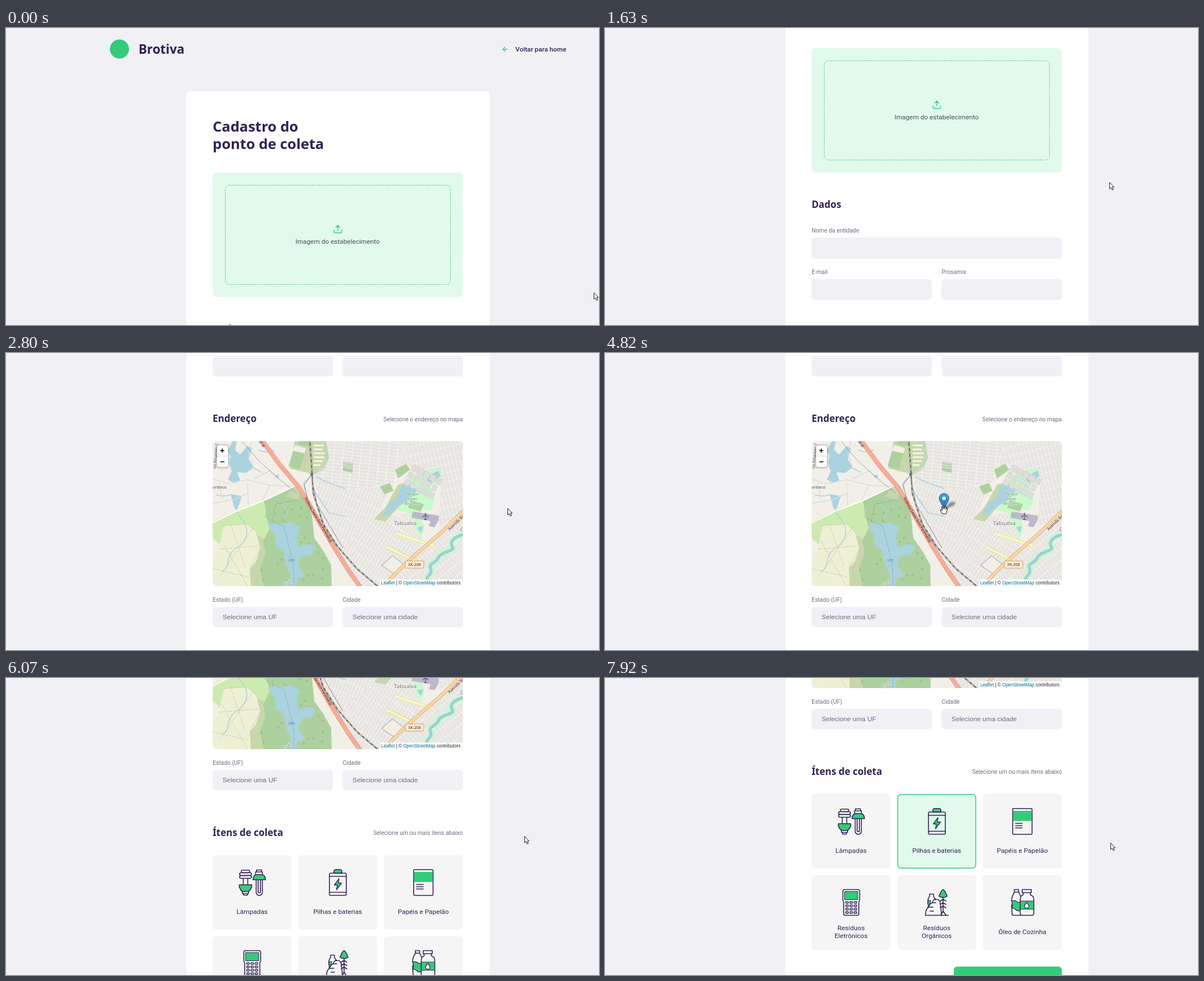
These frames come from a looping animation (1056x530 px, 8000 ms). An HTML page:

```html
<!DOCTYPE html>
<html lang="pt-BR">
<head>
<meta charset="utf-8">
<title>Cadastro do ponto de coleta</title>
<style>
html, body { margin: 0; width: 100%; height: 100%; overflow: hidden; background: #f0f0f5; }
svg { display: block; }
text { font: 11.84px Roboto, sans-serif; fill: #322153; }
.h, .h1, .brand { font-family: "Noto Sans", "Open Sans", sans-serif; font-weight: 700; }
.h { font-size: 17px; }
.h1 { font-size: 25.5px; }
.brand { font-size: 22.5px; }
.back { font-weight: 500; }
.label { font-size: 10.36px; fill: #6c6c80; }
.select { font-family: "Liberation Sans", Arial, sans-serif; fill: #6c6c80; }
.mid { text-anchor: middle; }
.end { text-anchor: end; }
.field { fill: #f0f0f5; }
.tile { fill: #f5f5f5; }
.line { fill: none; stroke: #34cb79; stroke-linecap: round; stroke-linejoin: round; }
#icons { fill: none; stroke: #322153; stroke-width: 1.6; stroke-linejoin: round; stroke-linecap: round; }
#icons .g { fill: #34cb79; }
#icons .w { fill: #f5f5f5; }
#map text { font: 7px "Noto Sans", sans-serif; fill: #333; paint-order: stroke; stroke: #fff; stroke-width: 1.2px; stroke-linejoin: round; }
#map .road { fill: #4a1d10; stroke: none; }
#map .park { font-style: italic; fill: #3a8a3a; text-anchor: middle; }
#map .credit { font: 8.14px "Liberation Sans", Arial, sans-serif; stroke: none; }
#map .link { fill: #0078a8; }
#map .zoom { font: bold 14px "Liberation Sans", Arial, sans-serif; fill: #000; stroke: none; text-anchor: middle; }
.water { fill: #aad3df; }
.wood { fill: #add19e; }
.scrub { fill: #c8d7ab; }
.grass { fill: #cdebb0; }
.stream { fill: none; stroke: #aad3df; }
.way { fill: none; stroke-linejoin: round; }
.cursor { fill: #fff; stroke: #000; stroke-width: .9; stroke-linejoin: round; }
</style>
</head>
<body>
<svg width="1056" height="530" viewBox="0 0 1056 530">
<defs>
  <clipPath id="mapClip"><rect x="368" y="157.5" width="445.5" height="258.5" rx="6"/></clipPath>
  <path id="forest" d="M460 264L517 236 527 243 545 290 549 330 565 353 579 378 580 416H459L452 385 462 358 458 335 470 312 463 290Z"/>
  <clipPath id="forestClip"><use href="#forest"/></clipPath>
  <path id="highway" d="M455 155L488 200 522 240 535 262 560 305 585 348 608 385 631 418"/>
  <path id="rail" d="M541 155L545 215 547 250 565 305 590 345 625 385 664 418"/>
  <path id="avenue" d="M815 281L773 322 738 352 705 382 670 418"/>
  <path id="lanes" d="M694 322L762 344M678 346L735 374"/>
  <path id="river" d="M814 324C794 330 790 338 795 346S774 354 770 365 752 374 756 385 748 396 749 406"/>
  <linearGradient id="pinFill" x2="0" y2="1"><stop stop-color="#4a9fda"/><stop offset="1" stop-color="#2070b0"/></linearGradient>
  <filter id="soft"><feGaussianBlur stdDeviation="1.5"/></filter>
  <g id="pin">
    <path d="M9 30L18 18Q27 13 29 17T20 25Z" fill="#333" opacity=".5" filter="url(#soft)"/>
    <path transform="scale(.74)" d="M12.5.5C5.8.5.5 5.8.5 12.5 .5 19 7 25 12.5 40.5 18 25 24.5 19 24.5 12.5 24.5 5.8 19.2.5 12.5.5Z" fill="url(#pinFill)" stroke="#2e6c97"/>
    <circle cx="9.25" cy="9.3" r="3.1" fill="#fff"/>
  </g>
</defs>
<rect width="1056" height="530" fill="#f0f0f5"/>
<g id="page">
  <circle cx="202" cy="37.5" r="17" fill="#34cb79"/>
  <text class="brand" x="236" y="46">Brotiva</text>
  <path class="line" stroke-width="1.3" d="M892.5 38H885M888.5 34.3L885 38 888.5 41.7"/>
  <text class="back" x="907" y="42">Voltar para home</text>

  <rect x="321" y="113" width="540" height="1600" rx="6" fill="#fff"/>
  <text class="h1" x="368" y="185">Cadastro do</text>
  <text class="h1" x="368" y="216">ponto de coleta</text>
  <rect x="368" y="258" width="445.5" height="221.7" rx="7" fill="#e1faec"/>
  <rect x="390.5" y="280.5" width="401" height="177" rx="7" fill="none" stroke="#4ecb79" stroke-dasharray="2.5 1.7"/>
  <path class="line" transform="translate(582 350) scale(.74)" stroke-width="2" d="M21 15v4a2 2 0 0 1-2 2H5a2 2 0 0 1-2-2v-4M17 8L12 3 7 8M12 3V15"/>
  <text class="mid" x="590.5" y="385" style="fill:#4e4958">Imagem do estabelecimento</text>

  <text class="h" x="368" y="543">Dados</text>
  <text class="label" x="368" y="587">Nome da entidade</text>
  <rect class="field" x="368" y="596" width="445.5" height="37.5" rx="6"/>
  <text class="label" x="368" y="661">E-mail</text>
  <text class="label" x="599.5" y="661">Prosamix</text>
  <rect class="field" x="368" y="670" width="214" height="37" rx="6"/>
  <rect class="field" x="599.5" y="670" width="214" height="37" rx="6"/>

  <text class="h" x="368" y="788">Endereço</text>
  <text class="label end" x="813.5" y="786.5">Selecione o endereço no mapa</text>
  <g transform="translate(0 665)"><g id="map" clip-path="url(#mapClip)">
    <rect x="368" y="157" width="446" height="260" fill="#f2efe9"/>
    <g id="streets"></g>
    <path class="grass" d="M368 301L408 281 430 273 462 263 472 312 458 335 440 340 384 345 368 330Z"/>
    <path class="scrub" d="M440 322L458 330 466 358 462 416H434V375L448 345Z"/>
    <path d="M388 308L430 305 446 320 453 348 445 372 434 385 436 416H382L368 408V372L380 345Z" fill="#eef0d5"/>
    <path class="way" d="M388 308L430 305 446 320 453 348 434 385M380 350L450 344M400 306L425 380M440 312L380 400M368 385L432 400M384 335L430 416" stroke="#c9b08b" stroke-width=".8" stroke-dasharray="3 2"/>
    <use href="#forest" class="wood"/>
    <path class="scrub" d="M515 238L527 244 520 262 498 256Z"/>
    <g id="trees" clip-path="url(#forestClip)"></g>
    <path class="water" d="M466 307L480 303 493 305 507 302 524 311 518 330 521 346 540 340 552 347 545 359 526 362 520 378 533 398 519 402 517 416H505L507 395 498 377 494 352 481 345 479 324Z"/>
    <path class="way" d="M474 300L495 309 504 345 512 380 513 416M474 300L480 270 520 262M460 290L474 300" stroke="#8aa6a0" stroke-width=".9" stroke-dasharray="4 1.5"/>
    <path class="stream" d="M412 275C405 290 434 300 428 325S400 345 396 370 385 385 383 390M497 302L501 284 492 270" stroke-width="1.5"/>
    <path class="water" d="M404 157H411L408 173 417 181 430 166 438 170 432 190 441 204 428 214 412 213 417 227 407 232 395 226 402 211 397 196 400 184 395 174Z"/>
    <path class="water" d="M400 252L420 255 412 279 407 278ZM481 217l5 1-1 6-6-2Z"/>
    <path class="stream" d="M450 173Q465 180 478 173M374 253Q390 258 402 252M440 205L456 213" stroke-width="1.5"/>
    <path class="way" d="M368 225L395 233 430 226 470 236 516 238M430 232L432 274M441 205L432 180 438 157M470 236L455 266M368 268L405 262 432 250M485 225L470 210 440 225M380 232L384 260" stroke="#dedad4" stroke-width="1.4"/>
    <path class="way" d="M420 157L450 192 470 210 490 228 518 250" stroke="#8c8c8c" stroke-width=".8"/>
    <path class="way" d="M368 303L408 283 460 263 517 236" stroke="#fff" stroke-width="2"/>

    <path class="scrub" d="M514 157H570L575 186 565 205 546 216 505 206Z"/>
    <path class="wood" d="M511 176L532 179 523 208 503 202ZM523 157H540V166L517 163ZM600 193L618 196 617 214 600 210Z"/>
    <path d="M515 164L534 170 532 179 510 174Z" fill="#f2efe9"/>
    <path class="way" d="M600 195L618 198M600 199L618 202M600 203L618 206" stroke="#dedddc" stroke-width="2"/>
    <path class="way" d="M548 165H566M548 172H566M548 179H568M548 186H567M548 193H564M548 200H560" stroke="#f7f3ea" stroke-width="3"/>
    <path class="stream" d="M570 157L565 172 574 187 566 207 547 216 530 232 532 245M553 221L570 230 604 242M548 245L575 285 605 292" stroke-width="1.6"/>

    <path class="wood" d="M693 208L712 198 720 208 698 224ZM666 238L684 232 690 246 674 252Z"/>
    <path d="M715 226L740 212 770 205 776 222 755 238 764 260 757 281 738 279 745 314 738 333 729 312 716 285 690 278 702 250Z" fill="#c8facc"/>
    <path class="scrub" d="M698 235L716 230 707 266 676 301 655 296 676 275Z"/>
    <path class="water" d="M704 237L722 234 732 246 716 265 694 275 682 291 672 287 680 270 697 258ZM748 222L770 210 774 219 752 234ZM732 311L743 309 739 321Z"/>
    <path class="wood" d="M720 262L744 270 739 283 716 276Z"/>
    <g id="blocks" fill="#dedddc" stroke="#c8c5c2" stroke-width=".5"></g>
    <path d="M724 283L771 290 770 299 763 311 753 309 756 300 722 294Z" fill="#bbb9cb"/>
    <path d="M747 285v13M741 293l6-4 6 4M744 297h6" stroke="#6b5b95" stroke-width="1.5" fill="none"/>

    <g class="way">
      <use href="#lanes" stroke="#d8d39a" stroke-width="6"/>
      <use href="#lanes" stroke="#f7f8be" stroke-width="4.6"/>
      <path d="M688 362L709 378 691 394 669 379Z" fill="#f2efe9" stroke="#b9b3b5" stroke-width="1.2"/>
      <use href="#river" stroke="#c8facc" stroke-width="12"/>
      <use href="#river" stroke="#9fcdda" stroke-width="5.5"/>
      <use href="#avenue" stroke="#c9a16b" stroke-width="6"/>
      <use href="#avenue" stroke="#fcd6a4" stroke-width="4.6"/>
      <use href="#highway" stroke="#d5735a" stroke-width="7.6"/>
      <use href="#highway" stroke="#f9b29c" stroke-width="6.4"/>
      <use href="#highway" stroke="#e6957e" stroke-width=".7"/>
      <use href="#rail" stroke="#707070" stroke-width="2.6"/>
      <use href="#rail" stroke="#eee" stroke-width="1.1" stroke-dasharray="5 5"/>
      <path d="M546 215L531 235 542 278 580 335M545 225L554 270 600 348" stroke="#888" stroke-width="1"/>
    </g>
    <path d="M542 214h5v5h-5z" fill="#777"/>

    <text transform="translate(373 207) rotate(-84)">ua Amarildo T</text>
    <text x="368" y="242">oribeco</text>
    <text class="road" transform="translate(449 157) rotate(52)">etral</text>
    <text class="road" transform="translate(531 259) rotate(60)" style="font-size:6.5px">Rodovia Sexto Arco Perimetral</text>
    <text x="503" y="372" style="font-style:italic;fill:#4d80b3;stroke:none">Uré</text>
    <text transform="translate(494 417) rotate(-32)" style="fill:#666">elvaia</text>
    <text class="park" x="724" y="254">Parque</text>
    <text class="park" x="724" y="262.5">Fonte</text>
    <text class="park" x="724" y="271">da Lontra</text>
    <text x="691" y="307" style="font-size:9.7px;fill:#666">Tabualva</text>
    <text class="road" transform="translate(790 317) rotate(-44)">Avenida Bo</text>
    <text x="809" y="318" style="font-size:9px;fill:#666">C</text>
    <rect x="711" y="371" width="33" height="13" rx="2" fill="#fbe8d0" stroke="#c9a16b"/>
    <text x="727.5" y="380" class="mid" style="stroke:none">XK-208</text>

    <use id="pinA" href="#pin" x="626" y="228"/>
    <use id="pinB" href="#pin" x="594.5" y="250"/>

    <rect x="374.8" y="164" width="21.5" height="41" rx="4" fill="#000" opacity=".3" filter="url(#soft)"/>
    <rect x="376" y="165" width="19.2" height="38.5" rx="3" fill="#fff"/>
    <path d="M376 184H395.2" stroke="#ccc" stroke-width=".8"/>
    <text class="zoom" x="385.2" y="179">+</text>
    <text class="zoom" x="385.2" y="198.5">−</text>
    <rect x="666" y="404" width="148" height="12" fill="#fff" opacity=".75"/>
    <text class="credit" x="668" y="413"><tspan class="link">Leaflet</tspan> | © <tspan class="link">OpenStreetMap</tspan> contributors</text>
  </g></g>

  <text class="label" x="368" y="1109">Estado (UF)</text>
  <text class="label" x="599.5" y="1109">Cidade</text>
  <rect class="field" x="368" y="1118" width="214" height="36.5" rx="6"/>
  <rect class="field" x="599.5" y="1118" width="214" height="36.5" rx="6"/>
  <text class="select" x="385.7" y="1139.5">Selecione uma UF</text>
  <text class="select" x="617" y="1139.5">Selecione uma cidade</text>

  <text class="h" x="368" y="1235.5">Ítens de coleta</text>
  <text class="label end" x="813.5" y="1234">Selecione um ou mais itens abaixo</text>
  <g id="tiles"></g>
  <rect id="chosen" x="521.3" y="1270.8" width="139" height="131.5" rx="6" fill="#e1faec" stroke="#34cb79" stroke-width="1.5"/>
  <g id="captions"></g>
  <g id="icons" transform="translate(0 1063)">
    <rect x="419" y="234" width="15" height="4.5" rx="2.2"/>
    <rect x="416" y="238.5" width="21" height="5" rx="2.5"/>
    <rect x="416" y="243.5" width="21" height="5" rx="2.5"/>
    <path d="M422.5 248.5V260M430.5 248.5V260"/>
    <path class="g" d="M415.5 260H437.5V264Q436 269 432 272H421Q417 269 415.5 264Z"/>
    <path d="M421 272V275.5H432V272M423 275.5V278.5H430V275.5M446 237V233.5H455V237M444.5 242V237H456.5V242M445.5 251V273.5A5.3 5.3 0 0 0 456.5 273.5V251M449 251V273Q451 276 453 273V251"/>
    <path class="g" d="M440 251Q440 242 447 242H455Q462 242 462 251Z"/>

    <path class="g" d="M584 239.5V236Q584 233 587 233H595Q598 233 598 236V239.5Z"/>
    <rect x="576" y="239.3" width="30" height="39.5" rx="2"/>
    <path d="M576 245H606M576 273.5H606"/>
    <path class="g" stroke-width="1.3" d="M593 249L584.5 260.5H590L588.5 269 597.5 257H592Z"/>

    <rect x="726" y="233" width="34.5" height="46" rx="2"/>
    <path class="g" stroke="none" d="M726.8 237H759.8V255H726.8Z"/>
    <path d="M731 259.5H743M731 263.5H743M731 267.5H743"/>

    <path d="M427 377.5H450Q453.5 377.5 453.5 381V396L452 400V421Q452 423.5 449 423.5H428Q425 423.5 425 421V400L423.5 396V381Q423.5 377.5 427 377.5Z"/>
    <path class="g" stroke-width="1" d="M427 381H450V395.5H427Z"/>
    <g id="keys" stroke-width="1.3"></g>

    <path d="M578 390V385.5H585V390M578 390Q575 393 575 398V403M585 390Q588 393 588 396"/>
    <path class="g" stroke-width="1" d="M575.5 397H580L578 406 575.5 409Z"/>
    <path d="M570.5 423.5Q571 412 576 409 577 403 583 401 584 394 590 395 597 395 597 403 599 414 599 423.5ZM583 401H589M576 409H584M579 416H585M570.5 423.5H611.5"/>
    <path class="g" d="M602 377.5Q605 378 609 389Q608 391.5 602 391.5T595 389Q599 378 602 377.5Z"/>
    <path d="M602 391.5V418M597 398L602 395 607 398M597 404L602 401 607 404M597 410L602 407 607 410M598 423L602 416 607 423"/>

    <path d="M729 382V377.5H736.5V382ZM729 382Q724 391 724 397 727 402 724 406L725 421Q725 423.5 728 423.5H740M736.5 382L740 389"/>
    <path class="g" stroke-width="1.2" d="M724 398Q730 396 733 399T740 399V415Q735 417 731 413T724.5 412Q727 404 724 398Z"/>
    <path class="w" d="M743 383V377.5H759V383ZM744.5 383H757.5V387Q763.5 389 763.5 394V420Q763.5 423.5 760 423.5H743Q739.5 423.5 739.5 420V394Q739.5 389 744.5 387Z"/>
    <path class="g" stroke-width="1.2" d="M739.5 398H763.5V412.5H739.5Z"/>
    <path class="w" stroke-width="1.2" d="M751 400.5Q755 405 755 407A4 3.6 0 0 1 747 407Q747 405 751 400.5Z"/>
  </g>
  <rect x="621" y="1578" width="192.5" height="40" rx="6" fill="#34cb79"/>
</g>
<g id="cursor" class="cursor">
  <path id="arrow" d="M.5.5V12L3.2 9.6 5.2 14 7.2 13.1 5.3 8.9H8.5Z"/>
  <path id="grab" d="M-3 8L-6.3 2Q-6.8-.2-4.5.3L-3 2.5-4.2-4Q-3.5-6-2.3-4L-1.2-.5-.9-6.5Q.5-8 1-6L1.2-.7 2.4-5.5Q4-6.8 4.2-4.5L3.8.2 5-2.5Q6.8-3 6.4-1L5 4 4 8Z"/>
  <path id="point" d="M-1 14.5L-4 9Q-4.4 6.6-2.3 7.5L-1.2 8.7V1Q0-.6 1.2 1V5.5Q3 0 3.4 5.8 5-.2 5.2 6.4 7 5 7 7.5V11L5.8 14.5Z"/>
</g>
</svg>
<script>
const $ = id => document.getElementById(id);
let seed = 7;
const rand = () => (seed = (seed * 16807) % 2147483647) / 2147483647;

// Street grids: tilt, spacing across and along, outline
const grids = [
  [6, 16, 6, 'M548 157H712L690 232 604 246 548 218 575 190Z'],
  [22, 6, 19, 'M548 218L604 244 690 236 655 296 700 318 690 360 640 414 566 300Z'],
  [-14, 7, 15, 'M712 157H814V290L770 310 776 222 715 200 695 225Z'],
  [32, 6, 19, 'M655 296L716 285 740 333 738 352 670 416H640L628 385 600 345Z'],
  [-38, 7, 16, 'M814 281V416H672L738 352Z'],
  [55, 6, 17, 'M548 250L566 306 625 385 660 416H634L560 305Z']
];
$('streets').innerHTML = grids.map(([tilt, w, h, d], i) => {
  const cross = `M0 ${h / 2}H${w}M${w / 2} 0V${h}`;
  return `<pattern id="grid${i}" width="${w}" height="${h}" patternUnits="userSpaceOnUse" patternTransform="rotate(${tilt})">
    <rect width="${w}" height="${h}" fill="#e9e6e1"/>
    <path d="${cross}" stroke="#d8d5d1" stroke-width="2.6"/><path d="${cross}" stroke="#f8f7f5" stroke-width="1.6"/>
  </pattern><path d="${d}" fill="url(#grid${i})"/>`;
}).join('');

let trees = '';
for (let i = 0; i < 48; i++) {
  const x = 440 + rand() * 135, y = 250 + rand() * 165;
  trees += `M${x} ${y}l-2 3h4zv5`;
}
$('trees').innerHTML = `<path d="${trees}" fill="none" stroke="#8fbc82" stroke-width=".7"/>`;

let blocks = '';
for (let row = 0; row < 3; row++)
  for (let col = 0; col < 5; col++)
    blocks += `<rect x="${col * 12}" y="${row * 14}" width="${8 + rand() * 3}" height="11"/>`;
$('blocks').innerHTML = `<g transform="translate(726 199) rotate(28)">${blocks}</g>`;

let keys = '';
for (const y of [399, 405, 411, 417])
  for (const x of [428.5, 436, 443.5]) keys += `<rect x="${x}" y="${y}" width="5" height="3" rx="1"/>`;
$('keys').innerHTML = keys;

const items = ['Lâmpadas', 'Pilhas e baterias', 'Papéis e Papelão', 'Resíduos|Eletrônicos', 'Resíduos|Orgânicos', 'Óleo de Cozinha'];
items.forEach((name, i) => {
  const x = 368 + (i % 3) * 152.5, y = 1270 + (i > 2) * 145;
  const lines = name.split('|');
  $('tiles').innerHTML += `<rect class="tile" x="${x}" y="${y}" width="140.5" height="133" rx="6"/>`;
  $('captions').innerHTML += lines.map((s, n) =>
    `<text class="mid" x="${x + 70.2}" y="${y + 105 + (n - (lines.length - 1) / 2) * 14.4}">${s}</text>`).join('');
});

// Moves: start, last step, step count, end value
const scrolls = [
  [1250, 1630, 6, 222], [1860, 2270, 6, 443], [2410, 2720, 5, 665],
  [5360, 5680, 5, 813], [5910, 6280, 6, 1035], [7690, 7920, 4, 1063]
];
const moves = [
  [70, 310, 4, [956, 350]], [610, 850, 4, [898, 275]], [2800, 2800, 1, [893, 277]],
  [2880, 3190, 5, [642, 252]], [3260, 3420, 3, [635, 258]], [3970, 4350, 6, [603.5, 279]],
  [4900, 5130, 4, [923, 282]], [6130, 6430, 5, [804, 296]], [6590, 6840, 5, [603, 329]],
  [7300, 7620, 5, [900, 294]]
];
const wheel = [.02, .3, .635, .83, .93, 1];
const glide = x => x < .5 ? 4 * x ** 3 : 1 - 4 * (1 - x) ** 3;
const mix = (a, b, p) => a + (b - a) * p;

function wheelAt(x) {
  const u = x * 5, i = Math.min(4, Math.floor(u));
  return mix(wheel[i], wheel[i + 1], u - i);
}
function stepOf(t, start, last, n) {
  if (t >= last) return n - 1;
  return Math.floor((t - start) / (last - start) * (n - 1) + .15);
}
function scrollAt(t) {
  let y = 0;
  for (const [start, last, n, end] of scrolls)
    if (t >= start) y = mix(y, end, wheelAt(stepOf(t, start, last, n) / (n - 1)));
  return Math.abs(y - Math.round(y)) < .45 ? Math.round(y) : y;
}
function cursorAt(t) {
  let [x, y] = [1046.5, 472];
  for (const [start, last, n, end] of moves) {
    if (t < start) break;
    const p = glide((stepOf(t, start, last, n) + 1) / n);
    [x, y] = [mix(x, end[0], p), mix(y, end[1], p)];
  }
  return [x, y];
}
const show = (id, on) => $(id).setAttribute('visibility', on ? 'visible' : 'hidden');

function draw() {
  const t = performance.now() % 8000;
  const top = scrollAt(t), [x, y] = cursorAt(t);
  const py = y + top;
  const inside = x > 368 && x < 813.5;
  const onMap = inside && py > 822 && py < 1081;
  const onTile = inside && (x - 368) % 152.5 < 140.5 && py > 1270 && py < 1548 && (py - 1270) % 145 < 133;
  $('page').setAttribute('transform', `translate(0 ${-top})`);
  $('cursor').setAttribute('transform', `translate(${x} ${y})`);
  show('grab', onMap);
  show('point', onTile);
  show('arrow', !onMap && !onTile);
  show('pinA', t >= 3500 && t < 4500);
  show('pinB', t >= 4500);
  show('chosen', t >= 6990);
  requestAnimationFrame(draw);
}
draw();
</script>
</body>
</html>
```
